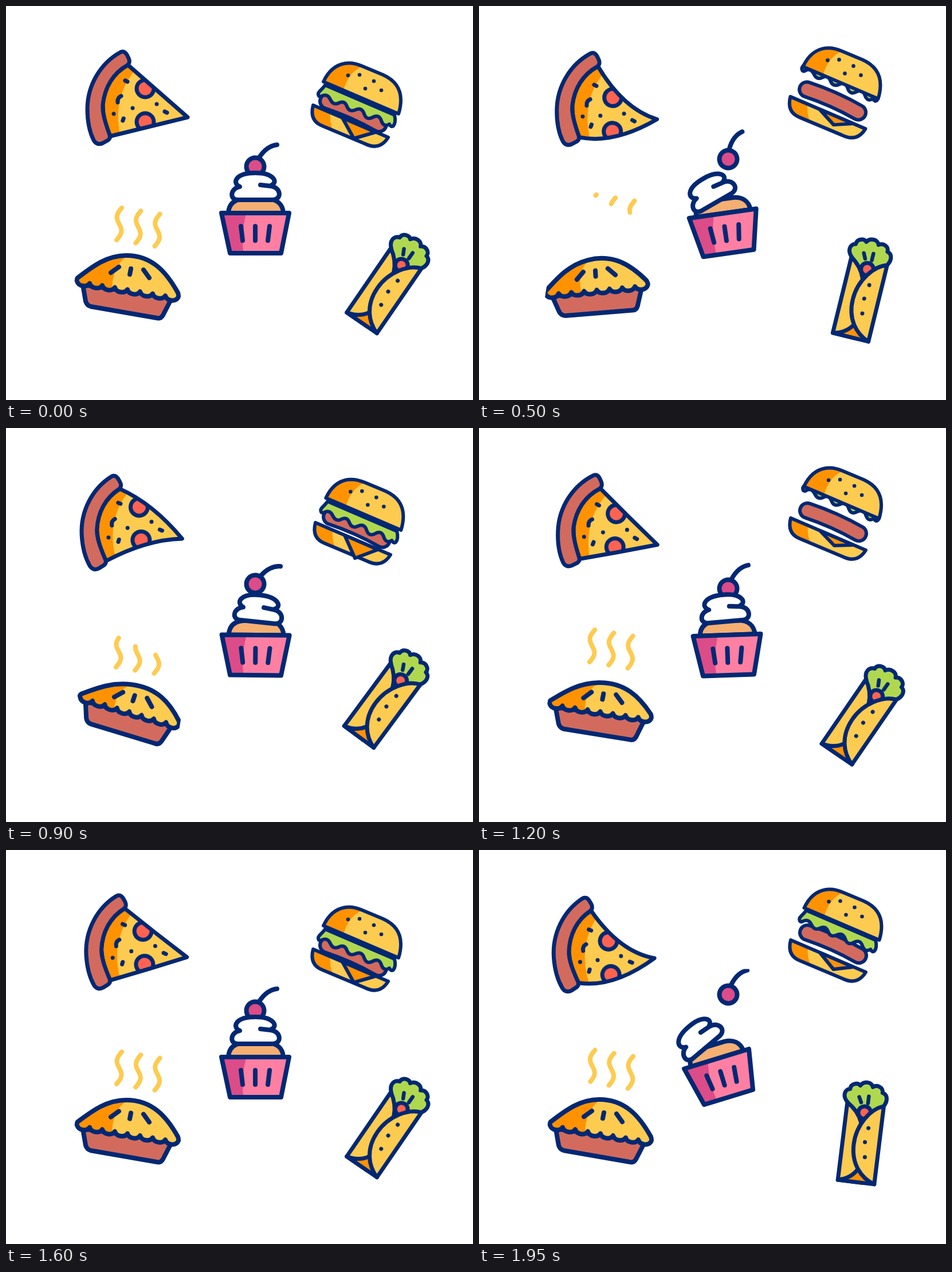
Recreate the animation shown at these times as an HTML page with a canvas. Size 815 px wide and 687 px high, loop 2 s.

```html
<!DOCTYPE html>
<html lang="en">
<head>
<meta charset="utf-8">
<title>Food</title>
<style>
html, body { margin: 0; width: 100%; height: 100%; overflow: hidden; background: #fff; }
canvas { display: block; }
</style>
</head>
<body>
<canvas id="stage" width="815" height="687"></canvas>
<script>
const g = document.getElementById('stage').getContext('2d');
const NAVY = '#022873', YELLOW = '#fdcb50', ORANGE = '#ff9200', BROWN = '#d26b5d',
  RED = '#ff6350', GREEN = '#b0d84f', PINK = '#ff7fa3', ROSE = '#dc4c88', TAN = '#f5af72';
const LOOP = 2000, STEP = 50;

// Each row: time, then the values of the pose
const PIZZA = [ // x, y, turn, tip bend, middle bend
  [0, 0, 0, 0, 0, 0], [50, -3, 0, -2.7, -1, 0], [300, -32, 9, -19, -2, 8.5],
  [400, -13, 4.5, -4.3, 0, 15.5], [500, -6, 2, .7, 0, 14.5], [900, -11, 4.5, -3.3, 2, -8],
  [1200, -3.5, 1.5, 2.3, 3, 2], [1550, 0, 0, 0, 0, 0]];
const BURGER = [ // bun lift, base lift, lettuce curl, cheese drip
  [0, 0, 0, 0, 0], [100, .32, .5, 0, 4], [300, .88, .93, .15, -5], [350, 1, 1, .1, -7],
  [400, .97, 1, 1, -10], [500, .85, .93, 1, -9], [650, .4, .5, .2, 0], [800, 0, 0, 0, 0]];
const CUPCAKE = [ // cup turn, cream x, y, turn, cherry y, turn
  [0, 0, 435, 337, 0, 280, 0], [300, -15.5, 399, 344, -32, 254, -4.5],
  [350, -17, 396, 343, -40, 252, -7], [500, -8, 414, 341, -30, 267, -18],
  [650, 0, 433, 337, -8, 280, -10], [900, .5, 438.5, 337, 6, 272, 10],
  [1200, -2, 430, 336.5, -5, 280, -4.5], [1600, 0, 435, 337, 0, 280, 0]];
const PIE = [ // turn, dome squash
  [0, 0, 0], [100, 0, 0], [300, -6, 2], [500, -14.5, 5], [900, 7, 12],
  [1200, -.7, 9], [1600, 0, 1], [1850, 0, 0]];
const BURRITO = [ // x, y, turn
  [0, 621, 552.5, 34.5], [300, 654, 576, 9.2], [350, 658, 579, 7], [500, 648.5, 577.5, 13.8],
  [700, 627, 565, 37], [900, 616, 538.5, 36.5], [1200, 624.5, 568.5, 34.5], [1600, 621, 552.5, 34.5]];

// Smooth interpolation that never overshoots a key
function pose(keys, time) {
  const last = keys.length - 1, t = time % keys[last][0];
  const i = keys.findIndex(k => k[0] > t) - 1;
  const rise = (j, c) => (keys[j + 1][c] - keys[j][c]) / (keys[j + 1][0] - keys[j][0]);
  const slope = (j, c) => {
    if (j < 1 || j >= last) return 0;
    const a = rise(j - 1, c), b = rise(j, c);
    return a * b > 0 ? 2 * a * b / (a + b) : 0;
  };
  const span = keys[i + 1][0] - keys[i][0], u = (t - keys[i][0]) / span, v = 1 - u;
  return keys[i].slice(1).map((from, n) => {
    const c = n + 1;
    return from * v * v * (1 + 2 * u) + keys[i + 1][c] * u * u * (3 - 2 * u)
      + span * u * v * (slope(i, c) * v - slope(i + 1, c) * u);
  });
}

function line(d, width, color = NAVY) {
  g.lineWidth = width;
  g.strokeStyle = color;
  g.stroke(new Path2D(d));
}

function fill(d, color) {
  g.fillStyle = color;
  g.fill(new Path2D(d));
}

// Filled outline with optional detail clipped to its inside
function shape(d, color, width, detail) {
  fill(d, color);
  if (detail) {
    g.save();
    g.clip(new Path2D(d));
    detail();
    g.restore();
  }
  line(d, width);
}

function dot(x, y, r = 3.5, color = NAVY) {
  g.beginPath();
  g.arc(x, y, r, 0, 7);
  g.fillStyle = color;
  g.fill();
}

function ball(x, y, r, color, width) {
  dot(x, y, r + width / 2);
  dot(x, y, r - width / 2, color);
}

// Draw with an offset and a turn in degrees about a pivot
function moved(x, y, turn, draw, px = 0, py = 0) {
  g.save();
  g.translate(px + x, py + y);
  g.rotate(turn * Math.PI / 180);
  g.translate(-px, -py);
  draw();
  g.restore();
}

function pizza(t) {
  const [x, y, turn, tipBend, midBend] = pose(PIZZA, t);
  const a = 4 * midBend - tipBend, c = 2 * tipBend - 4 * midBend;
  const push = (px, py, d) => [px - .25 * d, py + .97 * d];
  const bend = (px, py) => {
    const u = Math.max(0, ((px - 188) * .97 + (py - 161) * .25) / 136);
    return push(px, py, a * u + c * u * u);
  };
  const edge = (px, py) => push((px + 317) / 2, (py + 194) / 2, a / 2);
  const dash = (px, py, dx, dy) => {
    const [bx, by] = bend(px, py);
    line(`M${bx - dx} ${by - dy}l${2 * dx} ${2 * dy}`, 7);
  };
  moved(x, y, turn, () => {
    const slice = `M213 103Q${edge(213, 103)} ${push(317, 194, tipBend)}Q${edge(182, 227)} 182 227`
      + 'Q169 200 169 172C172 142 187 117 213 103Z';
    shape(slice, YELLOW, 7, () => {
      fill('M150 90H224V113Q186 160 199 224V245H150Z', ORANGE);
      ball(...bend(243, 144), 15, RED, 7);
      ball(...bend(243, 202), 15, RED, 7);
    });
    for (const p of [[188, 188], [221, 178], [263, 171]]) dot(...bend(...p));
    dash(210, 131, 2, 1);
    dash(204.5, 198, -.7, 2);
    dash(279, 185, 2, 1);
    const [bx, by] = bend(197, 163);
    line(`M${bx + 4} ${by - 6}q-7 3 -6 11`, 7);
    shape('M199 81C165 100 142 138 142 180C142 203 147 222 153 234C157 241 163 242 169 239'
      + 'L178 234C182 231 182 228 181 225C172 200 168 185 169 172C172 142 187 117 212 103'
      + 'C216 100 216 95 214 91L211 85C208 80 204 78 199 81Z', BROWN, 7);
  }, 188, 161);
}

function burger(t) {
  const [bun, base, curl, drip] = pose(BURGER, t);
  moved(8 * base, -16 * base, 0, () => {
    shape('M536 173L667 229Q652 253 626 240L552 209Q529 200 536 173Z', YELLOW, 6,
      () => fill('M520 160L566 186Q564 205 573 222L520 230Z', ORANGE));
    shape(`M587 195L${607 - drip * .5} ${231 + drip}L645 220Z`, ORANGE, 6);
  });
  moved(12 * base, -22 * base, 0, () => {
    const patty = 'M561 166Q609 182 651 206';
    line(patty, 32);
    line(patty, 20, BROWN);
  });
  moved(13.5 * bun + 7 * curl, -31 * bun - 18 * curl, 0, () =>
    shape('M557 138C550 148 542 150 546 157Q549 159 551 157Q561 152 566 163T581 169T595 175'
      + 'T610 181T625 188T640 194T655 200T669 206Q672 212 676 209Q681 203 678 190Z', GREEN, 6));
  moved(13.5 * bun, -31 * bun, 0, () => {
    shape('M554 132Q567 104 592 100Q606 98 622 105L658 120Q689 134 689 164Q689 176 685 188Z',
      YELLOW, 6, () => fill('M540 90H640L622 105Q597 116 589 147L540 150Z', ORANGE));
    for (const p of [[597, 121], [617, 120], [642, 131], [627, 144], [655, 147]]) dot(...p, 3.3);
  });
}

function cupcake(t) {
  const [cupTurn, creamX, creamY, creamTurn, cherryY, cherryTurn] = pose(CUPCAKE, t);
  const cup = draw => moved(0, 0, cupTurn, draw, 435.5, 431);
  g.save();
  g.beginPath();
  g.rect(330, 207.5, 200, 260);
  g.clip();
  cup(() => shape('M388 361C389 343 401 337 415 336H457C472 337 483 345 484 361Z', TAN, 8));
  moved(435, cherryY, cherryTurn, () => {
    line('M7 -16Q20 -36 38 -38', 8);
    ball(0, 0, 15.5, ROSE, 8);
  });
  moved(creamX, creamY, creamTurn, () =>
    shape('M9 -25L27 -23C45 -21 47 0 31 1H-31C-46 0 -43 -19 -27 -22C-41 -28 -35 -46 0 -46'
      + 'C33 -46 41 -29 27 -24', '#fff', 8));
  cup(() => {
    shape('M376 361H494L480 431H391Z', PINK, 8,
      () => fill('M370 355H421Q409 396 415 436H370Z', ROSE));
    line('M410 384L413 409M435 384V409M460 384L457 409', 8);
  });
  g.restore();
}

function pie(t) {
  const [turn, squash] = pose(PIE, t);
  const top = 435 + squash;
  g.save();
  g.clip(new Path2D('M130.5 410H320.5L294.5 575H104.5Z'));
  moved(0, 0, turn, () => {
    shape('M134 486L139 515Q141 522 148 524L263 544Q270 546 274 539L290 508Z', BROWN, 8);
    const crust = 'M124 480' + 'a12 10 9 0 0 22 3.6'.repeat(8)
      + `Q302 506 300 500C280 ${464 + squash / 2} 255 ${top} 210 ${top}`
      + `C175 ${top} 150 ${455 + squash / 2} 125 474Q122 477 124 480Z`;
    shape(crust, YELLOW, 8,
      () => fill(`M110 420H212V${top}Q180 458 186 510H110Z`, ORANGE));
    moved(0, squash * .6, 0, () =>
      line('M183 465L197 455M218 458L216 468M240 460L250 474', 8));
  }, 212, 520);
  g.restore();
}

function wisp(i, from, to, lift) {
  if (to <= from) return;
  let d = '';
  for (let n = 0; n <= 24; n++) {
    const u = from + (to - from) * n / 24;
    const x = 202 + 33.3 * i + .12 * lift - 9 * u - 6 * Math.sin(2 * Math.PI * u);
    d += (n ? 'L' : 'M') + x + ' ' + (352 + 5.4 * i - lift + 56 * u);
  }
  line(d, 8, YELLOW);
}

function steam(time) {
  const t = time % 1850, part = v => Math.min(1, Math.max(0, v / 420));
  for (let i = 0; i < 3; i++) {
    wisp(i, 0, t < 740 ? 1 - part(t - 90 - 70 * i) : 0, .05 * Math.max(0, t - 40));
    wisp(i, 1 - part(t - 520 - 70 * i), 1, -.05 * Math.max(0, 1080 - t));
  }
}

function burrito(t) {
  const [x, y, turn] = pose(BURRITO, t);
  const flap = 'C10 -130 -12 -100 -12 -65C-12 -30 8 -8 32 0';
  moved(x, y, turn, () => {
    shape('M-31 -136C-42 -145 -40 -158 -30 -160C-30 -170 -18 -173 -13 -168C-8 -177 6 -177 9 -168'
      + 'C16 -174 28 -169 27 -160C37 -158 38 -146 31 -136L0 -100Z', GREEN, 7);
    line('M-12.5 -148L-8 -139M4 -151V-139', 6.5);
    ball(0, -122, 11, RED, 7);
    shape('M-32 -136Q-12 -124 -4 -104L10 0H-32Z', YELLOW, 7);
    shape('M-32 0Q-10 -5 0 -22L32 0Z', ORANGE, 7);
    shape(`M32 -137${flap}Z`, YELLOW, 7);
    for (const p of [[10, -96], [7, -71], [10, -45]]) dot(...p);
  });
}

function frame(now) {
  const t = Math.floor((now % LOOP) / STEP) * STEP;
  g.fillStyle = '#fff';
  g.fillRect(0, 0, 815, 687);
  for (const draw of [pizza, burger, steam, pie, cupcake, burrito]) draw(t);
}

g.lineCap = g.lineJoin = 'round';
const start = performance.now();
(function tick() {
  frame(performance.now() - start);
  requestAnimationFrame(tick);
})();
</script>
</body>
</html>
```
